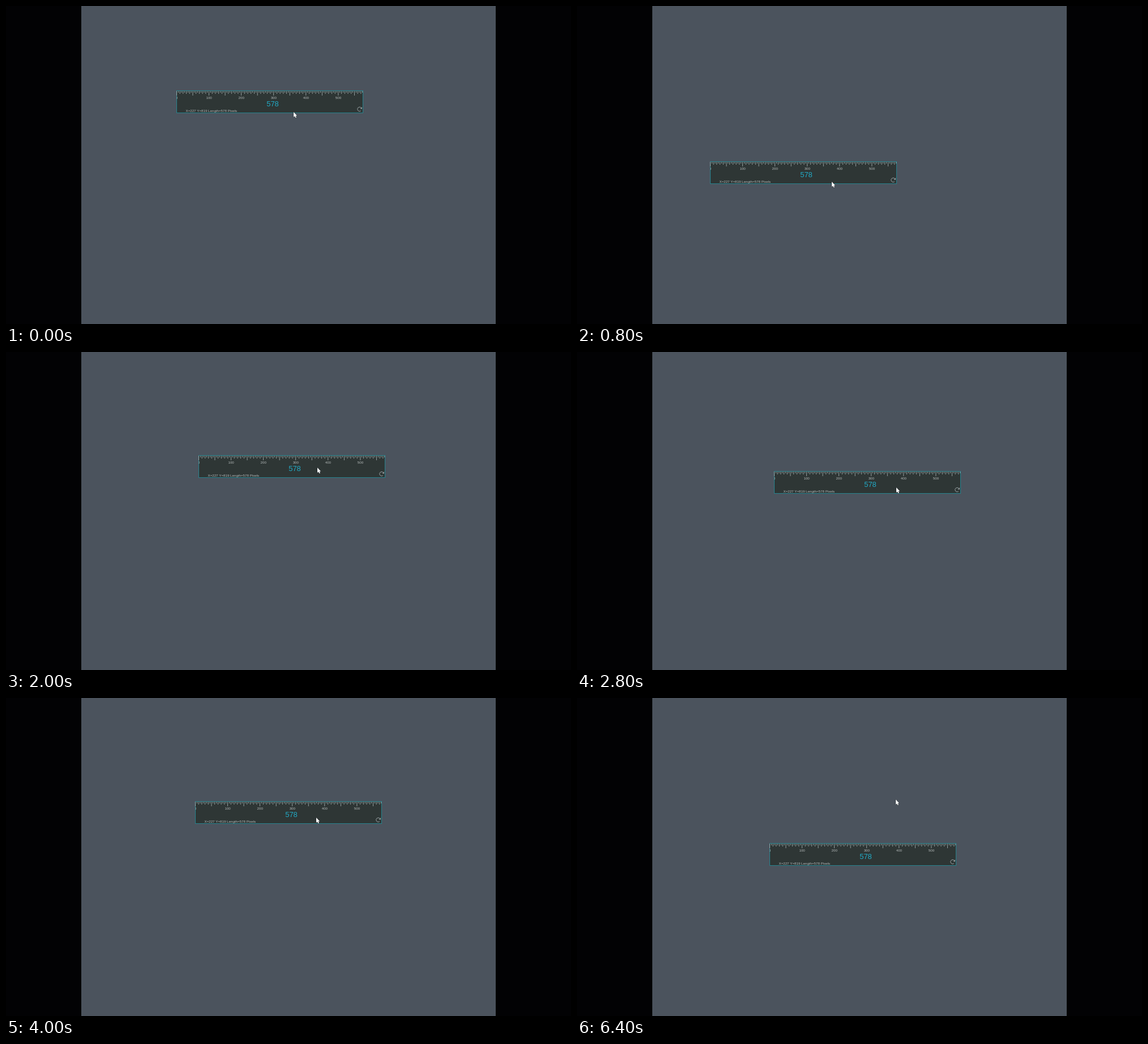
These frames come from a looping animation (998x561 px, 6.8 s). An HTML page with a canvas:

```html
<!DOCTYPE html>
<html>
<head>
<meta charset="utf-8">
<style>
html, body { margin: 0; width: 100%; height: 100%; overflow: hidden; background: #000; }
canvas { display: block; }
</style>
</head>
<body>
<canvas id="stage" width="998" height="561"></canvas>
<script>
const ctx = document.getElementById('stage').getContext('2d');
const LOOP = 6800, STEP = 200;
const SCALE = 0.571, WIDTH = 330, HEIGHT = 40, LENGTH = 578;

// Turning points of the circling drag: [step, x, y].
const drag = [
  [0, 301, 149], [4, 235, 274], [6, 360, 337], [8, 384, 272], [10, 340, 182],
  [12, 344, 164], [14, 348, 210], [17, 344, 249], [20, 334, 182], [23, 340, 256]
];

// Pointer offset from the ruler; it leaves upwards at the end.
const grip = [
  [0, 207, 38], [4, 215, 36], [10, 210, 22], [14, 216, 29],
  [17, 210, 30], [23, 220, 14], [27, 223, -77]
];

// Smooth curve through the keys, at rest outside their range.
function follow(keys, step) {
  const last = keys.length - 1;
  const i = keys.findIndex(key => key[0] > step) - 1;
  if (i < 0) return keys[last].slice(1);
  const key = n => keys[Math.max(0, Math.min(last, n))];
  const a = key(i), b = key(i + 1), span = b[0] - a[0];
  const t = (step - a[0]) / span;
  const slope = (n, axis) =>
    (key(n + 1)[axis] - key(n - 1)[axis]) / (key(n + 1)[0] - key(n - 1)[0]) * span;
  return [1, 2].map(axis => Math.round(
    a[axis] + (b[axis] - a[axis]) * t * t * (3 - 2 * t) +
    t * (1 - t) * ((1 - t) * slope(i, axis) - t * slope(i + 1, axis))));
}

function label(text, x, y, size, color, align = 'center') {
  ctx.font = `${size}px "Liberation Sans", Arial, sans-serif`;
  ctx.textAlign = align;
  ctx.fillStyle = color;
  ctx.fillText(text, x, y);
}

function drawRotateIcon(x, y) {
  ctx.strokeStyle = ctx.fillStyle = '#98a1a3';
  ctx.beginPath();
  ctx.arc(x, y, 3.7, 0.9, 5.6);
  ctx.stroke();
  ctx.beginPath();
  ctx.moveTo(x + 4.5, y - 4);
  ctx.lineTo(x + 4.5, y - 0.5);
  ctx.lineTo(x + 1, y - 0.5);
  ctx.fill();
}

function drawRuler(x, y) {
  ctx.save();
  ctx.translate(x, y);
  ctx.beginPath();
  ctx.rect(0, 0, WIDTH, HEIGHT);
  ctx.clip();
  ctx.fillStyle = '#2e3635';
  ctx.fillRect(0, 0, WIDTH, HEIGHT);
  ctx.lineWidth = 1;
  ctx.strokeStyle = '#27838e';
  ctx.strokeRect(0.5, 0.5, WIDTH - 1, HEIGHT - 1);

  ctx.fillStyle = '#abb8b9';
  for (let n = 0; n <= LENGTH; n += 5) {
    const size = n % 50 === 0 ? 8 : n % 10 === 0 ? 5 : 3;
    ctx.fillRect(n * SCALE, 1, 0.8, size);
  }
  for (let n = 0; n < LENGTH; n += 100) label(n, n * SCALE + 0.5, 14.7, 6.2, '#b5bbbb');

  label(LENGTH, 170, 28.4, 13, '#22a9c4');
  label(`X=227 Y=819 Length=${LENGTH} Pixels`, 16.5, 38.3, 6.2, '#b5bbbb', 'left');
  drawRotateIcon(323.5, 33);
  ctx.restore();
}

function drawPointer(x, y) {
  ctx.save();
  ctx.translate(x, y);
  const arrow = new Path2D('M0 0V9L2 7.3L3.5 10.3L5 9.6L3.7 6.7L6.2 6.4Z');
  ctx.strokeStyle = '#20272c';
  ctx.lineWidth = 1;
  ctx.stroke(arrow);
  ctx.fillStyle = '#fff';
  ctx.fill(arrow);
  ctx.restore();
}

function draw(now) {
  const step = Math.floor(now % LOOP / STEP);
  const [x, y] = follow(drag, step);
  const [dx, dy] = follow(grip, step);
  ctx.fillStyle = '#020204';
  ctx.fillRect(0, 0, 998, 561);
  ctx.fillStyle = '#4b535d';
  ctx.fillRect(133, 0, 732, 561);
  drawRuler(x, y);
  drawPointer(x + dx, y + dy);
  requestAnimationFrame(draw);
}
draw(performance.now());
</script>
</body>
</html>
```
